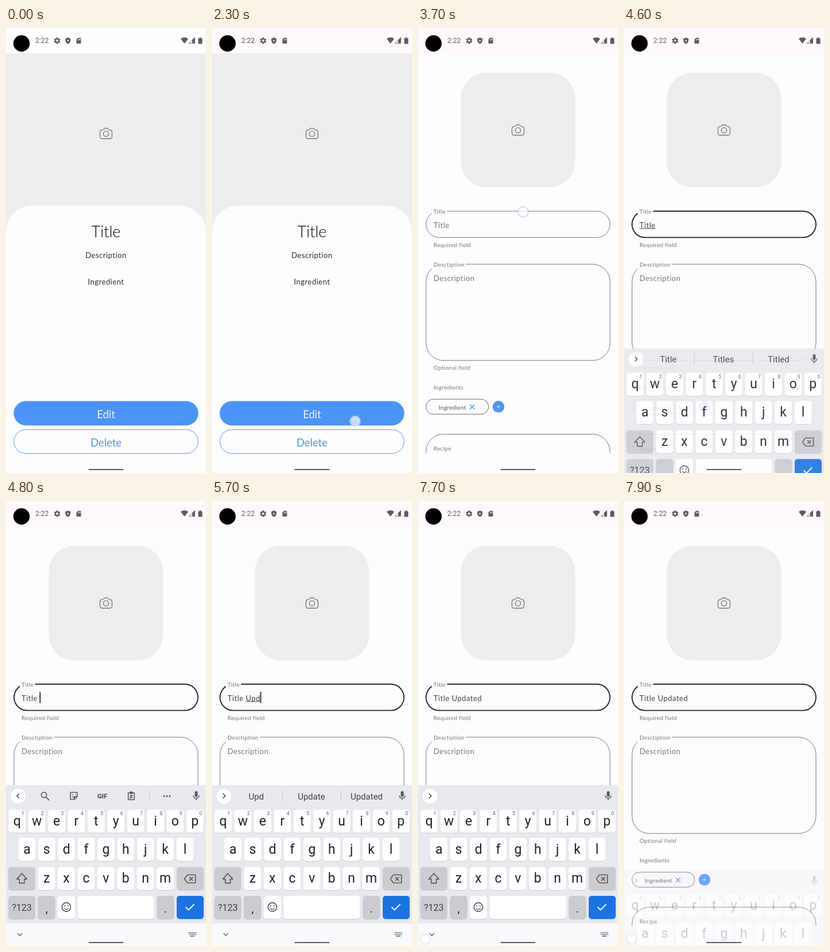
Write an HTML page with a canvas that moves like this. It is 348x772 px and loops after 8 s.

```html
<!DOCTYPE html>
<html lang="en">
<head>
<meta charset="utf-8">
<title>Recipe editor</title>
<style>
html, body { margin: 0; width: 100%; height: 100%; overflow: hidden; background: #fdfcfe; }
canvas { display: block; width: 348px; height: 772px; }
</style>
</head>
<body>
<canvas id="stage"></canvas>
<script>
const W = 348, H = 772, LOOP = 8000;
const BLUE = '#4a94fb', PAGE = '#fdfcfe', GREY = '#79777d', DARK = '#28262c', KEY_INK = '#1f2023', ICON = '#55585e';
const BODY = 'Lato, "Open Sans", sans-serif', ROBOTO = 'Roboto, Arial, sans-serif';

const dpr = window.devicePixelRatio || 1;
const stage = document.getElementById('stage');
const sheet = document.createElement('canvas');
for (const c of [stage, sheet]) { c.width = W * dpr; c.height = H * dpr; }
const main = stage.getContext('2d'), side = sheet.getContext('2d');
let g = main;

const clamp = v => Math.max(0, Math.min(1, v));
const smooth = v => v * v * (3 - 2 * v);

// Draws a group on its own layer, then blends it in as a whole.
function layer(alpha, draw) {
  if (alpha <= 0) return;
  g = side;
  g.setTransform(dpr, 0, 0, dpr, 0, 0);
  g.clearRect(0, 0, W, H);
  draw();
  g = main;
  g.globalAlpha = alpha;
  g.drawImage(sheet, 0, 0, W, H);
  g.globalAlpha = 1;
}

function rect(x, y, w, h, color) {
  g.fillStyle = color;
  g.fillRect(x, y, w, h);
}

function pill(x, y, w, h, r, fill, stroke, lw = 1) {
  g.beginPath();
  g.roundRect(x, y, w, h, r);
  if (fill) { g.fillStyle = fill; g.fill(); }
  if (stroke) { g.strokeStyle = stroke; g.lineWidth = lw; g.stroke(); }
}

function dot(x, y, r, fill, stroke, lw) {
  pill(x - r, y - r, 2 * r, 2 * r, r, fill, stroke, lw);
}

function text(s, x, y, size, color, { font = BODY, align = 'left', gap = 0, weight = 400 } = {}) {
  g.font = `${weight} ${size}px ${font}`;
  g.letterSpacing = gap + 'px';
  g.textAlign = align;
  g.fillStyle = color;
  g.fillText(s, x, y);
  return g.measureText(s).width;
}

const small = (s, x, y, color = '#77757b') => text(s, x, y, 10, color, { gap: 0.3 });
const body = (s, x, y, color, align) => text(s, x, y, 13, color, { gap: 0.5, align });
const label = (s, x, y, size, color, weight) => text(s, x, y, size, color, { font: ROBOTO, align: 'center', weight });

// Icons live on a 24 unit grid; a line width makes them outlined.
function icon(d, x, y, size, color, lw) {
  const p = new Path2D(d), k = size / 24;
  g.save();
  g.translate(x - size / 2, y - size / 2);
  g.scale(k, k);
  if (lw) {
    g.strokeStyle = color;
    g.lineWidth = lw / k;
    g.lineJoin = 'round';
    g.stroke(p);
  } else {
    g.fillStyle = color;
    g.fill(p, 'evenodd');
  }
  g.restore();
}

function camera(x, y) {
  icon('M5 6Q7 6 8 4.500Q9 3 10.500 3H13.500Q15 3 16 4.500Q17 6 19 6Q22.500 6.500 22.500 10V17Q22.500 21 18.500 21H5.500Q1.500 21 1.500 17V10Q1.500 6.500 5 6Z', x, y, 24, '#77777a', 1.3);
  dot(x, y + 0.5, 4.6, null, '#77777a', 1.3);
}

function statusBar(t) {
  rect(0, 0, W, 44, '#fefefe');
  g.globalAlpha = clamp((t - 100) / 700);
  rect(0, 0, W, 44, '#fff9fd');
  g.globalAlpha = 1;
  dot(27, 26.7, 14.2, '#000');
  const c = '#5d5b60';
  text('2:22', 51, 26.4, 12, c, { font: ROBOTO });
  g.save();
  g.translate(89, 22);
  g.fillStyle = c;
  for (let i = 0; i < 3; i++) {
    g.fillRect(-1.5, -5.5, 3, 11);
    g.rotate(Math.PI / 3);
  }
  g.restore();
  dot(89, 22, 4, c);
  dot(89, 22, 1.9, '#fffafd');
  icon('M12 1L3 5v6c0 5.500 3.8 10.700 9 12 5.200-1.300 9-6.500 9-12V5zM10 8l6 4-6 4z', 107.7, 22, 12, c);
  icon('M18 2h-8L4 8v12c0 1 1 2 2 2h12c1 0 2-1 2-2V4c0-1-1-2-2-2zM9 8h2v4H9zM12.500 5h2v5h-2zM16 5h2v5h-2z', 126.5, 22, 12, c);
  icon('M0 7a18 18 0 0 1 24 0L12 22z', 310.5, 21.5, 13, c);
  icon('M2 22h20V2z', 323.5, 21.5, 12, c, 0.8);
  icon('M13 22h9V2l-9 9z', 323.5, 21.5, 12, c);
  icon('M5 4h4V1h6v3h4v19H5z', 338, 22, 12, c);
}

function detailPage() {
  rect(0, 44, W, H - 44, '#ededee');
  camera(174, 183);
  pill(0, 308, W, H, 46, '#fdfdfd');
  text('Title', 174, 362.5, 27, '#000', { align: 'center', weight: 300 });
  body('Description', 174, 398.5, '#2c2c2c', 'center');
  body('Ingredient', 174, 445, '#2c2c2c', 'center');
  pill(13.4, 647.2, 321.2, 42.2, 21.1, BLUE);
  pill(13.8, 696.7, 320.4, 41.4, 20.7, '#fefefe', BLUE);
  text('Edit', 174, 677, 18.5, '#f3f7ff', { align: 'center' });
  text('Delete', 174, 726, 18.5, BLUE, { align: 'center' });
}

function outline(name, y, h, r, gapEnd, color, lw) {
  pill(14, y, 320, h, r, null, color, lw);
  if (!name) return;
  rect(24, y - 4, gapEnd - 24, 13, PAGE);
  small(name, 27, y + 3.8);
}

// time, field value, start of the underlined part, suggestions
const EDITS = [
  [0, 'Title', -1, null],
  [4500, 'Title', 0, ['Title', 'Titles', 'Titled']],
  [4700, 'Title ', -1, null],
  [5400, 'Title U', 6, ['U', 'Up', 'Us']],
  [5500, 'Title Up', 6, ['Up', 'Update', 'Upon']],
  [5700, 'Title Upd', 6, ['Upd', 'Update', 'Updated']],
  [5900, 'Title Upda', 6, ['Update', 'Updated', 'Updates']],
  [6000, 'Title Updat', 6, ['Update', 'Updated', 'Updates']],
  [6100, 'Title Update', 6, ['Update', 'Updated', 'Updates']],
  [6300, 'Title Updated', 6, ['Updated', 'Updates', '']],
  [7600, 'Title Updated', -1, []]
];
const CARET = [[3900, 4400], [4700, 6700], [7100, 7600]];

const editAt = t => EDITS.filter(e => e[0] <= t).pop();

function titleField(t) {
  const [, value, from] = editAt(t);
  const focus = clamp((t - 3900) / 150);
  outline('Title', 317.8, 45.6, 22.8, 50.5, focus > 0 ? DARK : GREY, 1 + 0.9 * focus);
  const w = body(value, 27, 346.5, focus > 0 ? '#414046' : GREY);
  if (from >= 0) {
    const start = g.measureText(value.slice(0, from)).width;
    rect(27 + start, 347.5, w - start, 1, '#4a484e');
  }
  if (CARET.some(([a, b]) => t >= a && t < b)) rect(27 + w - 0.3, 331, 1.8, 19.5, DARK);
}

function editPage(t) {
  rect(0, 44, W, H - 44, PAGE);
  pill(74.5, 77.5, 199, 199, 45, '#ededee');
  camera(174, 177);
  titleField(t);
  small('Required field', 27, 379.5);
  outline('Desctiption', 409.8, 167, 30, 83, GREY, 1);
  body('Description', 27, 438.5, GREY);
  small('Optional field', 27, 592.5);
  small('Ingredients', 27, 627);
  pill(13.8, 644, 109, 26, 13, null, '#6a686e');
  small('Ingredient', 36, 661.5, '#535157');
  icon('M2 2L22 22M22 2L2 22', 94.2, 657.3, 10, BLUE, 1.4);
  dot(140, 657, 10.2, BLUE);
  icon('M12 0V24M0 12H24', 140, 657, 6, '#fff', 0.9);
  g.save();
  g.beginPath();
  g.rect(0, 700, W, 37);
  g.clip();
  outline('', 704.6, 120, 30, 0, GREY, 1);
  small('Recipe', 27, 732.5);
  g.restore();
}

function key(x, y, w, color) {
  pill(x, y + 1, w, 40, 5, '#c9cad0');
  pill(x, y, w, 40, 5, color);
}

function keyRow(letters, x, y, digits) {
  [...letters].forEach((c, i) => {
    const cx = x + 34.4 * i;
    key(cx - 15, y, 30, '#fff');
    label(c, cx, y + 27, 23, KEY_INK);
    if (digits) label(String((i + 1) % 10), cx + 10, y + 9.8, 9, '#5f6368');
  });
}

function toolbar(words) {
  dot(21, 512, 12.8, '#fff');
  icon(words ? 'M8 4L16 12L8 20' : 'M16 4L8 12L16 20', 21, 511.5, 12, '#3f4247', 1.6);
  icon('M12 14a3 3 0 0 0 3-3V5a3 3 0 0 0-6 0v6a3 3 0 0 0 3 3z', 331, 511.5, 20, ICON);
  icon('M6 11a6 6 0 0 0 12 0M12 17v4', 331, 511.5, 20, ICON, 1.5);
  if (words) {
    words.forEach((s, i) => {
      label(s, 77 + 96 * i, 517.5, 15, '#404348');
      if (i < 2) rect(122 + 102 * i, 502, 1, 20, '#c4c6cb');
    });
    return;
  }
  dot(66, 510, 4.6, null, ICON, 1.7);
  icon('M14 14L22 22', 68, 512, 17, ICON, 2);
  icon('M3 3H21V14L14 21H3ZM21 14H14V21M8 8V10M16 8V10M8 14C10 16 12 16 14 14', 118, 511.5, 16, ICON, 1.5);
  label('GIF', 167.5, 515.5, 11.5, ICON, 900);
  icon('M4 4H20V22H4ZM9 2H15V6H9ZM8 11H16M8 15H16M8 18H13', 218, 511.5, 16, ICON, 1.5);
  rect(249, 502, 1, 20, '#c4c6cb');
  for (const x of [275, 280, 285]) dot(x, 512, 1.6, ICON);
}

function keyboard(words) {
  const mod = '#cbccd2';
  rect(0, 493, W, 240, '#e8e9ee');
  rect(0, 733, W, 300, '#fafafc');
  toolbar(words);
  keyRow('qwertyuiop', 19.2, 535.5, true);
  keyRow('asdfghjkl', 36.4, 584.5);
  keyRow('zxcvbnm', 70.6, 635);
  key(4, 635, 47, mod);
  icon('M12 2L2 13H7V21H17V13H22Z', 27.5, 655, 21, ICON, 1.6);
  key(297, 635, 47, mod);
  icon('M7 4H23V20H7L1 12ZM11 8.500L18 15.500M18 8.500L11 15.500', 320, 655.5, 21, ICON, 1.6);

  key(4, 685, 47, mod);
  label('?123', 27.5, 710.5, 16, '#404348');
  key(55.5, 685, 30, mod);
  label(',', 70.6, 714, 20, KEY_INK);
  key(90, 685, 30, '#fff');
  dot(105, 704.5, 7.6, null, ICON, 1.6);
  dot(102, 702.5, 1.1, ICON);
  dot(108, 702.5, 1.1, ICON);
  icon('M6 14C9 19 15 19 18 14', 105, 705, 15, ICON, 1.4);
  key(124.5, 685, 133, '#fff');
  key(262.5, 685, 30, mod);
  label('.', 277.5, 714, 20, KEY_INK);
  key(297, 685, 47, '#1b73e8');
  icon('M3 12L9 18L21 6', 320, 704.5, 20, '#fff', 1.8);

  icon('M4 8L12 16L20 8', 24, 752, 12, ICON, 1.3);
  for (let i = 0; i < 10; i++) rect(318 + (i % 5) * 2.8, 748 + Math.floor(i / 5) * 3, 1.7, 1.7, ICON);
  rect(320.5, 754, 7.5, 1.5, ICON);
}

function touch(x, y, ring) {
  dot(x, y, 9, 'rgba(255,255,255,.68)', ring, 1.6);
}

function frame(t) {
  g = main;
  g.setTransform(dpr, 0, 0, dpr, 0, 0);
  rect(0, 0, W, H, PAGE);

  const swap = smooth(clamp((t - 2400) / 700));
  layer(swap < 1 ? 1 : 0, detailPage);
  layer(swap, () => editPage(t));

  const rise = clamp((t - 4500) / 280), fall = clamp((t - 7750) / 193);
  const drop = 240 * (fall ? fall * fall : (1 - rise) ** 3);
  layer(Math.min(1, rise * 2.5) * (1 - fall), () => {
    g.translate(0, drop);
    keyboard(editAt(t)[3]);
  });

  statusBar(t);
  pill(143.5, 765, 61, 2, 1, '#5d5862');
  if (t >= 2300 && t < 2400) touch(249, 682, 'rgba(180,205,250,.75)');
  if (t >= 3700 && t < 3900) touch(183, 319, 'rgba(205,201,222,.9)');
  if (t >= 7600) touch(13, 760, 'rgba(225,224,232,.8)');
}

const began = performance.now();
function tick() {
  frame((performance.now() - began) % LOOP);
  requestAnimationFrame(tick);
}
tick();
</script>
</body>
</html>
```
